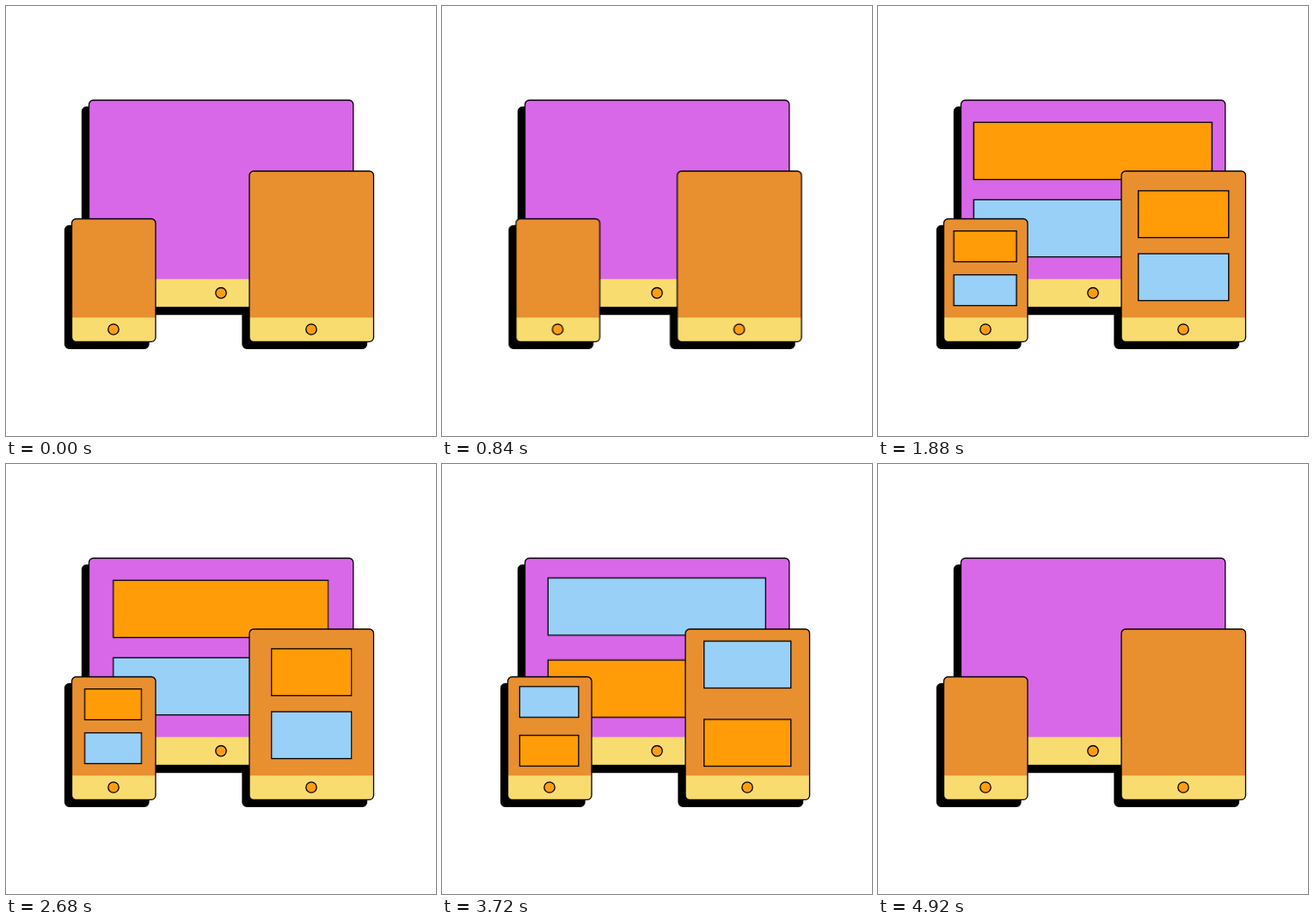
An HTML page that plays this animation: 500x500 px, repeating every 5 s.

```html
<!DOCTYPE html>
<html lang="en">
<head>
<meta charset="utf-8">
<title>Responsive devices</title>
<style>
  html, body { margin: 0; width: 100%; height: 100%; overflow: hidden; background: #fff; }
  svg { display: block; width: 100%; height: 100%; }

  .line { stroke: #000; stroke-width: 1.3; }
  .sway, .block { animation: 5s infinite cubic-bezier(.33, 0, .67, 1); }
  .sway { animation-name: sway; }
  .block {
    transform-box: fill-box;
    transform-origin: center;
    animation-name: widen, swap, flatten;
    animation-delay: 0s, 0s, var(--lag);
  }

  /* --side: direction of the device, --dir: direction of the block */
  @keyframes sway {
    0%, 26%, 100% { transform: translateX(0); }
    9.4% { transform: translateX(calc(var(--side) * 10px)); }
    17.6% { transform: translateX(calc(var(--side) * -10px)); }
  }
  @keyframes widen {
    0%, 25.6% { transform: scaleX(0); }
    37.6% { transform: scaleX(var(--peak)); }
    51.2% { transform: scaleX(var(--dip)); }
    59.2%, 100% { transform: scaleX(1); }
  }
  @keyframes swap {
    0%, 56.8% { translate: 0 0; }
    68.8% { translate: 0 calc(var(--dir) * (var(--gap) + var(--over))); }
    82.6%, 100% { translate: 0 calc(var(--dir) * var(--gap)); }
  }
  @keyframes flatten {
    0%, 81.6% { scale: 1 1; }
    95.6%, 100% { scale: 1 0; }
  }
</style>
</head>
<body>
<svg id="stage" viewBox="0 0 500 500"></svg>
<script>
  const devices = [
    { x: 96.5, y: 109.5, w: 307.3, h: 241, bar: 317.5, color: '#d868e8', cx: 249.8,
      block: [253, 66.5], top: 168.5, gap: 90, over: 4.3,
      side: 0, peak: 1.095, dip: .985, lag: 0 },
    { x: 76.5, y: 247.5, w: 97.5, h: 142.8, bar: 362.3, color: '#e88f30', cx: 124.6,
      block: [68.5, 35.8], top: 279.5, gap: 51, over: 4.5,
      side: -1, peak: 1.064, dip: .953, lag: 55 },
    { x: 283, y: 192, w: 144.5, h: 198.3, bar: 362.3, color: '#e88f30', cx: 355.2,
      block: [101, 54.5], top: 242.1, gap: 73.2, over: 14,
      side: 1, peak: 1.04, dip: .898, lag: 98 }
  ];

  const rect = (x, y, w, h, extra) =>
    `<rect x="${x}" y="${y}" width="${w}" height="${h}" ${extra}/>`;

  // All shadows lie behind all devices
  const shadow = ({ x, y, w, h, side }) =>
    rect(x - 8, y + 8, w, h, `rx="5" class="sway line" style="--side:${side}"`);

  function block(d, cy, dir, fill) {
    const [w, h] = d.block;
    return rect(d.cx - w / 2, cy - h / 2, w, h,
      `class="block line" fill="${fill}" style="--dir:${dir}"`);
  }

  function device(d, i) {
    const { x, y, w, h } = d;
    const vars = `--side:${d.side};--peak:${d.peak};--dip:${d.dip};` +
      `--gap:${d.gap}px;--over:${d.over}px;--lag:${d.lag}ms`;
    const barHeight = y + h - d.bar;
    return `<g class="sway" style="${vars}">
      <clipPath id="body${i}">${rect(x, y, w, h, 'rx="5"')}</clipPath>
      ${rect(x, y, w, h, `rx="5" fill="${d.color}"`)}
      ${rect(x, d.bar, w, barHeight, `fill="#f8dc70" clip-path="url(#body${i})"`)}
      ${rect(x, y, w, h, 'rx="5" fill="none" class="line"')}
      <circle cx="${Math.round(d.cx)}" cy="${d.bar + barHeight / 2 - .3}" r="6.2" fill="#ff9c10" class="line"/>
      ${block(d, d.top + d.gap, -1, '#98d0f8')}
      ${block(d, d.top, 1, '#ff9c08')}
    </g>`;
  }

  document.getElementById('stage').innerHTML =
    devices.map(shadow).join('') + devices.map(device).join('');
</script>
</body>
</html>
```
